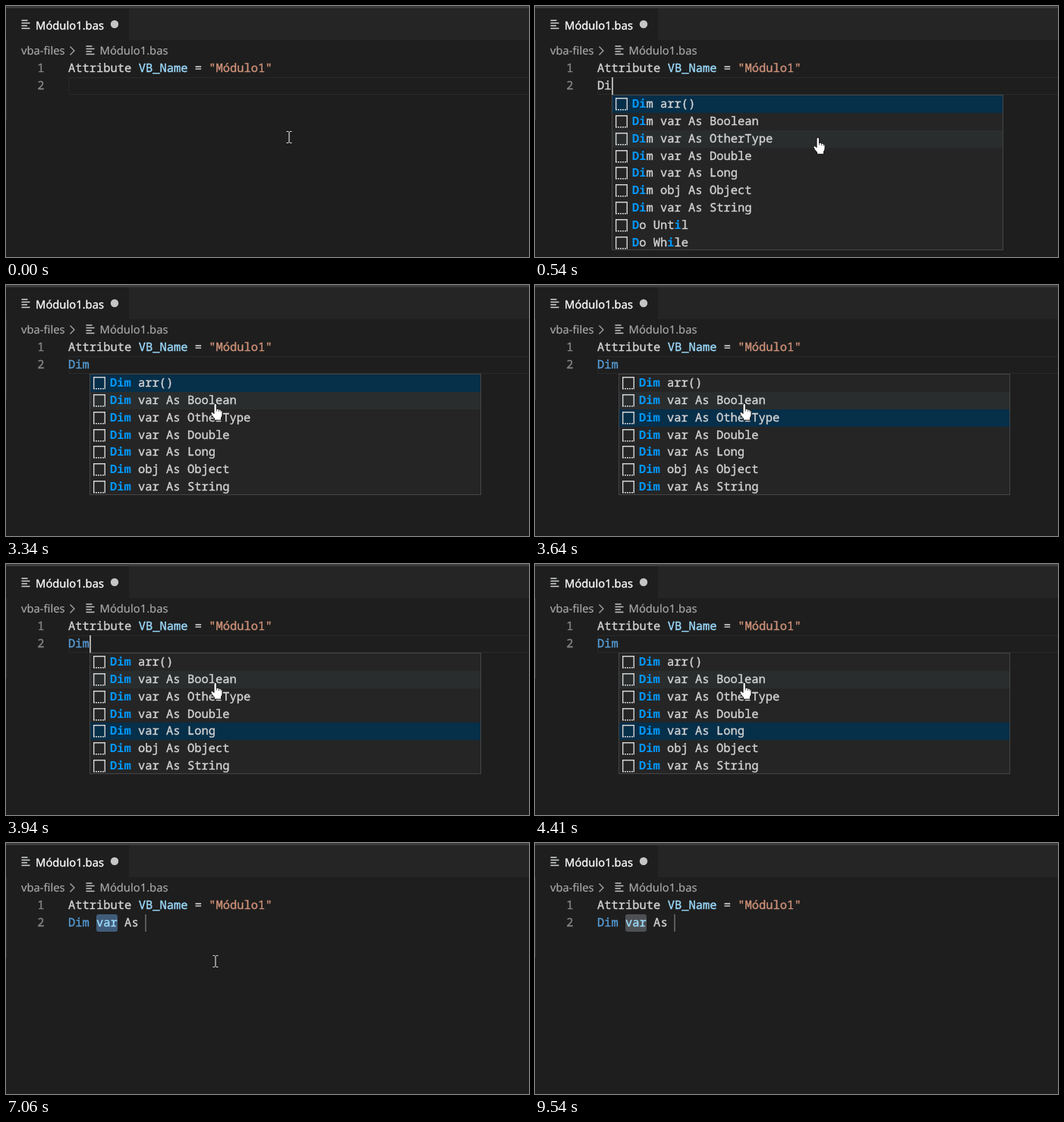
An HTML page that plays this animation: 689 px wide and 331 px high, repeating every 9.7 s.

```html
<!DOCTYPE html>
<html lang="en">
<head>
<meta charset="utf-8">
<title>Snippet completion</title>
<style>
  html, body { margin: 0; width: 100%; height: 100%; overflow: hidden; background: #1e1e1e; }
  svg { display: block; width: 689px; height: 331px; }
  text { white-space: pre; text-rendering: geometricPrecision; fill: currentColor; stroke: currentColor; }
  .ui { font: 14.75px "Noto Sans", sans-serif; color: #a9a9a9; stroke-width: .15px; }
  .title { color: #fff; stroke-width: .3px; }
  .code { font: 15.44px "Noto Sans Mono", monospace; color: #d4d4d4; stroke-width: .35px; }
  .num { color: #858585; text-anchor: middle; }
  .name { color: #9cdcfe; }
  .str { color: #ce9178; }
  .key { color: #569cd6; }
  .hit { color: #0097fb; font-weight: bold; stroke-width: 0; }
</style>
</head>
<body>
<svg viewBox="0 0 689 331" xmlns="http://www.w3.org/2000/svg">
  <defs>
    <path id="lines" d="M0 1H8M0 4.5H11M0 8H7.5M0 11.5H11" fill="none" stroke-width="1.6"/>
    <g id="snip" fill="none" stroke="#d4d4d4" stroke-width="1.4">
      <path d="M.7 16V.7H15.3V16"/>
      <path d="M0 15.8H16" stroke-dasharray="2 1"/>
    </g>
  </defs>
  <rect width="689" height="331" fill="#1e1e1e"/>
  <rect width="689" height="45" fill="#252526"/>
  <rect width="162" height="45" fill="#1e1e1e"/>
  <rect width="689" height="3" fill="#3c3c3c"/>
  <rect y="45" width="1" height="106" fill="#333"/>

  <use href="#lines" x="20.5" y="18" stroke="#d4d7d6"/>
  <text class="ui title" x="39" y="30.5">Módulo1.bas</text>
  <circle cx="143" cy="24" r="5.2" fill="#c5c5c5"/>
  <text class="ui" x="20" y="64">vba-files</text>
  <path d="M84.5 53.5l5.5 5.5-5.5 5.5" fill="none" stroke="#a9a9a9" stroke-width="1.3"/>
  <use href="#lines" x="105.5" y="52" stroke="#c5c8c6"/>
  <text class="ui" x="123.5" y="64">Módulo1.bas</text>

  <text class="code num" x="46" y="87.3">1</text>
  <text class="code num" x="46" y="110">2</text>
  <text class="code" x="82" y="87.3">Attribute <tspan class="name">VB_Name</tspan> = <tspan class="str">"Módulo1"</tspan></text>

  <rect id="current" x="83" y="94.5" width="608" height="22" fill="none" stroke="#2a2a2a"/>
  <g id="field">
    <rect id="mark" x="119" y="94" width="28" height="23" rx="3"/>
    <rect x="183" y="94" width="2" height="23" fill="#5a5a5a"/>
  </g>
  <text id="typed" class="code" x="82" y="110"></text>
  <rect id="caret" y="94" width="2" height="23" fill="#aeafad"/>

  <g id="popup">
    <rect id="box" x=".5" y=".5" width="515" fill="#252526" stroke="#454545"/>
    <rect id="hover" x="1" width="514" fill="#2a2d2e"/>
    <rect id="pick" x="1" width="514" fill="#062f4a"/>
    <g id="rows"></g>
  </g>

  <g id="mouse">
    <path id="beam" d="M-3.5-7.5H-.7M.7-7.5H3.5M0-7V7M-3.5 7.5H-.7M.7 7.5H3.5" fill="none" stroke="#dcdcdc" stroke-width="1.2"/>
    <g id="hand" stroke="#111">
      <path d="M-2 2Q-2 .4-.3.4T1.4 2V7.5Q4 6.8 4.3 8.3 6.6 7.6 7 9.2 9 8.8 9 10.8V15Q9 17 7.5 19V22.3H-1.5V20Q-5 16.5-6 13.5-6.4 11.6-4.6 11.6-3.2 12-2 13.6Z" fill="#fff"/>
      <path d="M1.4 7.5V10.5M4.3 8.3V11M7 9.2V11.5" stroke-width=".7"/>
    </g>
  </g>
</svg>
<script>
const LOOP = 9700, PITCH = 9.26, ROW = 22.8, TOP = 117;
const $ = id => document.getElementById(id);
const show = (id, on) => $(id).setAttribute('visibility', on ? 'inherit' : 'hidden');
const move = (id, x, y) => $(id).setAttribute('transform', `translate(${x} ${y})`);

const items = ['Dim arr()', 'Dim var As Boolean', 'Dim var As OtherType', 'Dim var As Double',
  'Dim var As Long', 'Dim obj As Object', 'Dim var As String', 'Do Until', 'Do While'];

// [start, value] lists hold each value until the next start
const typing = [[0, ''], [70, 'D'], [540, 'Di'], [850, 'Dim'], [5510, 'Dim var As ']];
const picks = [[0, 0], [3410, 1], [3640, 2], [3800, 3], [3940, 4], [4110, 5], [4410, 4], [4650, 3], [4810, 2]];
const blinks = [70, 1320, 1860, 2330, 2800, 3340, 3800, 4360, 4810, 5280,
  5510, 6040, 6510, 7060, 7530, 8000, 8540, 9070];
// [time, x, y]
const path = [[0, 373, 173], [1860, 373, 173], [2097, 338, 246], [2255, 308, 267], [2450, 289, 218],
  [2650, 281, 156], [2860, 281, 156], [2880, 276, 156], [8000, 276, 156], [8160, 444, 256], [LOOP, 444, 256]];

const held = (list, t) => list.filter(s => s[0] <= t).pop()[1];

// Row edges fall on whole pixels
const rowY = i => Math.round(1.2 + i * ROW);
function placeRow(id, i) {
  $(id).setAttribute('y', rowY(i));
  $(id).setAttribute('height', rowY(i + 1) - rowY(i));
}

function mouseAt(t) {
  // the pointer is refreshed about every 79 ms
  if (t > 1860 && t < 2650) t = 1860 + Math.floor((t - 1860) / 79) * 79;
  if (t > 8000) t = 8000 + Math.floor((t - 8000) / 80) * 80;
  const i = Math.max(1, path.findIndex(p => p[0] > t));
  const [a, b] = [path[i - 1], path[i]];
  const k = (t - a[0]) / (b[0] - a[0]);
  return [a[1] + (b[1] - a[1]) * k, a[2] + (b[2] - a[2]) * k];
}

// Marks the query letters in order, or returns null when one is missing
function match(label, query) {
  let n = 0, html = '';
  for (const c of label) {
    const hit = n < query.length && c.toLowerCase() === query[n].toLowerCase();
    if (hit) n++;
    html += hit ? `<tspan class="hit">${c}</tspan>` : c;
  }
  return n === query.length ? html : null;
}

let last = null, count = 0;
function setText(text, inList) {
  if (text === last) return;
  last = text;
  $('typed').innerHTML = text.replace('Dim', '<tspan class="key">Dim</tspan>')
    .replace('var', '<tspan class="name">var</tspan>');
  const found = inList ? items.map(s => match(s, text)).filter(Boolean) : [];
  count = found.length;
  $('rows').innerHTML = found.map((html, i) => `<g transform="translate(0 ${rowY(i)})">
    <use href="#snip" x="5" y="3"/><text class="code" x="27" y="16.2">${html}</text></g>`).join('');
  $('box').setAttribute('height', rowY(count) - 2);
}

function draw(t) {
  const text = held(typing, t);
  const done = t >= 5510, open = t >= 70 && !done;
  setText(text, open);

  const col = done ? 7 : text.length;
  const left = Math.round(82.3 + col * PITCH);
  $('caret').setAttribute('x', left);
  show('caret', blinks.filter(b => b <= t).length % 2);
  show('current', !done);
  show('field', done);
  $('mark').setAttribute('fill', t < 9540 ? '#405c79' : '#4e5053');

  const [x, y] = mouseAt(t);
  const over = Math.floor((y - TOP - 1) / ROW);
  show('popup', open);
  if (open) {
    move('popup', left, TOP);
    placeRow('pick', held(picks, t));
    placeRow('hover', over);
    show('hover', over >= 0 && over < count);
  }

  const hand = t >= 70 && t < 5580;
  show('mouse', t < 8240);
  show('hand', hand);
  show('beam', !hand);
  move('mouse', x.toFixed(1), y.toFixed(1));
}

const start = performance.now();
function tick() {
  draw((performance.now() - start) % LOOP);
  requestAnimationFrame(tick);
}
tick();
</script>
</body>
</html>
```
